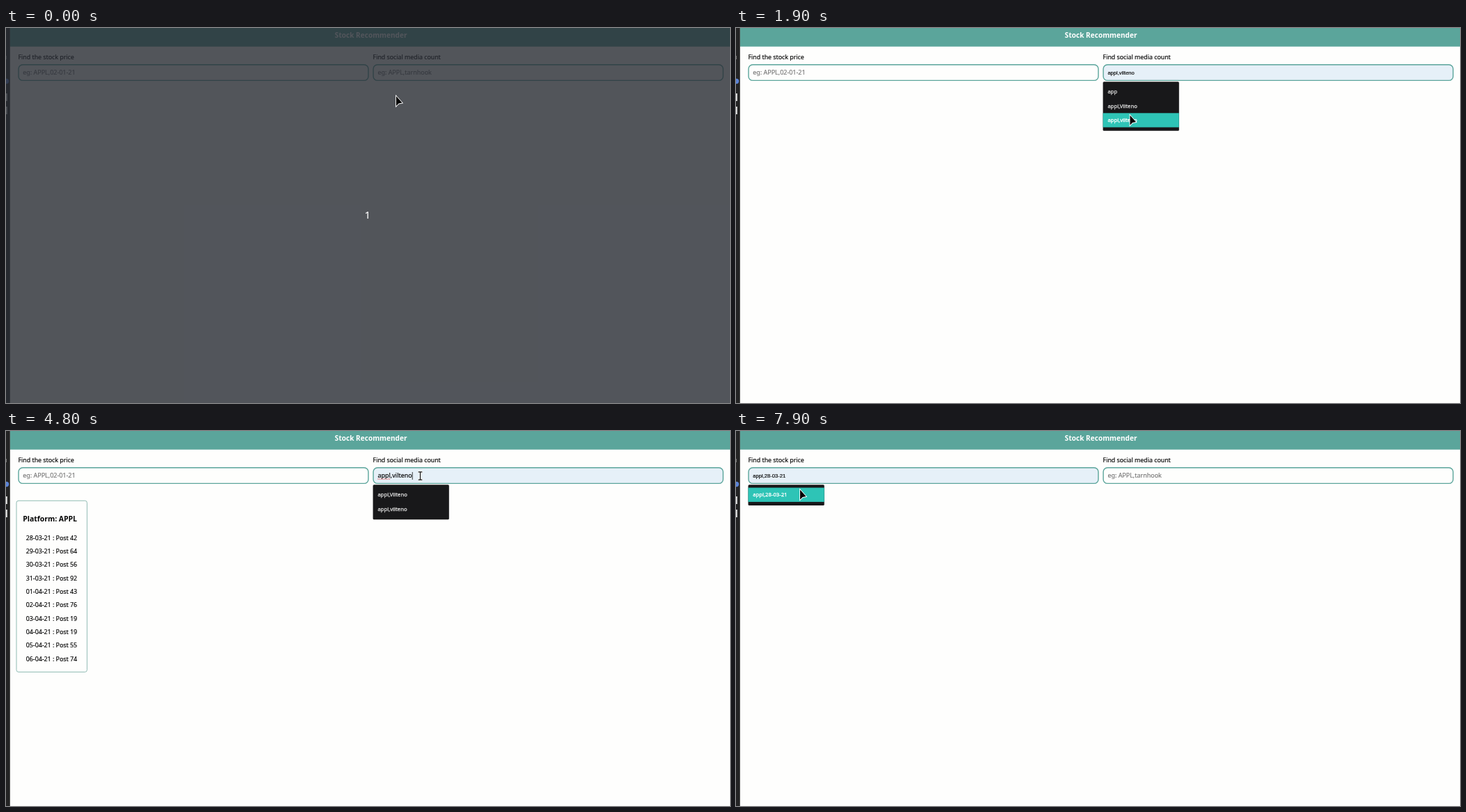
Animation, 1039 px wide and 539 px high, one loop 8000 ms. Source, as an HTML page:

```html
<!DOCTYPE html>
<html lang="en">
<head>
<meta charset="utf-8">
<title>Stock Recommender</title>
<style>
  html, body { margin: 0; width: 100%; height: 100%; overflow: hidden; background: #fefefd; }
  svg { display: block; width: 1039px; height: 539px; font-family: "Noto Sans", sans-serif; font-size: 8.8px; }
  text { white-space: pre; fill: #000; stroke: #000; stroke-width: 0.15; }
  .title { fill: #fff; stroke: none; font-size: 10.1px; font-weight: 700; text-anchor: middle; }
  .heading { stroke: none; font-size: 10.4px; font-weight: 700; }
  .count { fill: #fff; stroke: #fff; font-size: 14.5px; text-anchor: middle; }
  .box { fill: #fefefd; stroke: #5ba59b; stroke-width: 1.4; }
  .box.filled { fill: #e6f0f8; }
  .hint { fill: #757575; stroke: #757575; font-size: 8.95px; }
  .typed { font-size: 9px; }
  .preview { font: 7.6px "Liberation Sans", Arial, sans-serif; }
  .item { fill: #d8d8d8; stroke: #d8d8d8; stroke-width: 0.3; font-size: 7.7px; }
  .item.hot { fill: #fff; stroke: #fff; }
</style>
</head>
<body>
<svg id="stage" viewBox="0 0 1039 539"></svg>
<script>
const LOOP = 8000, FRAME = 100;
const ROW = 20.4, MENU_TOP = 77.3, FIRST_ROW = 81.5;
const stage = document.getElementById('stage');

function add(parent, tag, attrs = {}, text) {
  const el = document.createElementNS('http://www.w3.org/2000/svg', tag);
  for (const key in attrs) el.setAttribute(key, attrs[key]);
  if (text !== undefined) el.textContent = text;
  parent.append(el);
  return el;
}
const rect = (parent, x, y, width, height, fill, more) =>
  add(parent, 'rect', { x, y, width, height, fill, ...more });
const label = (parent, x, y, text, style = '') => add(parent, 'text', { x, y, class: style }, text);
const show = (el, on) => el.setAttribute('visibility', on ? 'visible' : 'hidden');
const within = (t, from, to) => t >= from && t < to;

// Page frame
rect(stage, 5.8, 0, 1034, 26.7, '#5ba59b');
label(stage, 523.7, 14.2, 'Stock Recommender', 'title');
rect(stage, 0, 0, 5.8, 539, '#232324');
rect(stage, 0, 40, 1, 5, '#777');
add(stage, 'circle', { cx: 0.5, cy: 76.5, r: 3.7, fill: '#5b83d8' });
for (const y of [94, 113]) rect(stage, 0, y, 1.8, 11, '#e4e4e4');

function makeField(x, title, hint, history) {
  label(stage, x, 45, title);
  const box = rect(stage, x + 0.5, 52.7, 502, 22.7, '#fff', { class: 'box', rx: 6 });
  const text = label(stage, x + 6.8, 67.3, hint);
  const caret = rect(stage, 0, 59, 0.8, 11, '#111');
  return { x, hint, history, box, text, caret };
}
const query = 'appl,vilteno';
const left = makeField(17.5, 'Find the stock price', 'eg: APPL,02-01-21', ['appl,28-03-21']);
const right = makeField(526.6, 'Find social media count', 'eg: APPL,tarnhook',
  ['app', 'appl,Vilteno', query]);
const squiggle = add(stage, 'path', { d: 'M533.5 69H552', stroke: '#d33', 'stroke-dasharray': '1.3 1' });

// Result card
const card = add(stage, 'g');
rect(card, 15, 100.2, 101.3, 246.2, '#fefefd', { rx: 3, stroke: '#8fbbb3' });
label(card, 24.3, 130, 'Platform: APPL', 'heading');
[42, 64, 56, 92, 43, 76, 19, 19, 55, 74].forEach((count, i) => {
  const [, month, day] = new Date(Date.UTC(2021, 2, 28 + i)).toISOString().slice(0, 10).split('-');
  label(card, 28.8, 156.6 + i * 19.33, `${day}-${month}-21 : Post ${count}`);
});

const menu = add(stage, 'g');
function drawMenu(x, items, hot) {
  menu.replaceChildren();
  if (!items.length) return;
  rect(menu, x, MENU_TOP, 109.2, 9.2 + items.length * ROW, '#18181a', { rx: 1.5 });
  items.forEach((item, i) => {
    const y = FIRST_ROW + i * ROW;
    if (i === hot) rect(menu, x, y, 109.2, ROW, '#2ec4b6');
    label(menu, x + 6.8, y + 12.8, item, i === hot ? 'item hot' : 'item');
  });
}

// Countdown veil and pointers
const veil = add(stage, 'g');
rect(veil, 0, 0, 1039, 539, 'rgba(39,43,51,.8)');
label(veil, 519, 274.2, '1', 'count');
const arrow = add(stage, 'path', {
  d: 'M0.5 0V14L4 10.6L9 9.6Z', fill: '#000', stroke: '#fff', 'stroke-width': 1.8, 'paint-order': 'stroke',
});
const beam = add(stage, 'g', { fill: 'none', 'stroke-linecap': 'round' });
for (const [stroke, width] of [['#fff', 2.6], ['#111', 1.2]])
  add(beam, 'path', { d: 'M-2.4 -5.6H2.4M0 -5.6V5.6M-2.4 5.6H2.4', stroke, 'stroke-width': width });

// Pointer moves: from time, to time, end point
const moves = [
  [200, 400, 575, 59], [900, 1200, 589, 83], [1200, 1400, 578, 114], [1500, 1700, 565, 125.5],
  [3000, 3300, 572, 108], [3400, 3900, 594.5, 64.5],
  [6200, 6800, 97, 64], [7300, 7900, 91.5, 84.5],
];
function pointerAt(t) {
  let x = 559.5, y = 98;
  for (const [from, to, endX, endY] of moves) {
    const p = Math.min(1, Math.max(0, (t - from) / (to - from)));
    const ease = p * p * (3 - 2 * p);
    x += (endX - x) * ease;
    y += (endY - y) * ease;
  }
  return [x, y];
}

// The query is picked whole, then erased key by key and finally by key repeat
function typedAt(t) {
  if (!within(t, 2400, 6300)) return '';
  const taps = [4900, 5100, 5400].filter(tap => tap <= t).length;
  const repeats = t < 5900 ? 0 : 4 + (t - 5900) / 50;
  return query.slice(0, Math.max(1, query.length - taps - repeats));
}

function drawField(field, text, style, filled, caretOn) {
  field.text.textContent = text || field.hint;
  field.text.setAttribute('class', text ? style : 'hint');
  field.box.setAttribute('class', filled ? 'box filled' : 'box');
  field.caret.setAttribute('x', field.x + 6.8 + (text ? field.text.getComputedTextLength() : 0));
  show(field.caret, caretOn);
}

function draw(t) {
  const [x, y] = pointerAt(t);
  const focus = within(t, 600, 6700) ? right : t >= 6800 ? left : null;
  const open = within(t, 700, 2400) || within(t, 4400, 6700) || t >= 6800;
  const typed = typedAt(t);
  const items = open ? focus.history.filter(item => item.toLowerCase().startsWith(typed)) : [];
  const row = Math.floor((y - FIRST_ROW) / ROW);
  const hot = items[row] ? row : -1;
  const hovering = hot >= 0;
  const caretOn = !hovering && (open || Math.floor(t / 500) % 2 === 1);

  for (const field of [left, right]) {
    const active = field === focus;
    const preview = active && hovering;
    const value = preview ? items[hot] : field === right ? typed : '';
    drawField(field, value, preview ? 'preview' : 'typed',
      preview || (field === right && typed === query), active && caretOn);
  }
  drawMenu(focus ? focus.x : 0, items, hot);
  show(squiggle, typed.startsWith('appl'));
  show(card, within(t, 2500, 4900));
  show(veil, t < 300);

  const overField = y < 76;
  show(beam, overField);
  show(arrow, !overField);
  (overField ? beam : arrow).setAttribute('transform', `translate(${x} ${y})`);
}

const begin = performance.now();
let last = -1;
function tick() {
  const t = Math.floor(((performance.now() - begin) % LOOP) / FRAME) * FRAME;
  if (t !== last) draw(last = t);
  requestAnimationFrame(tick);
}
tick();
</script>
</body>
</html>
```
